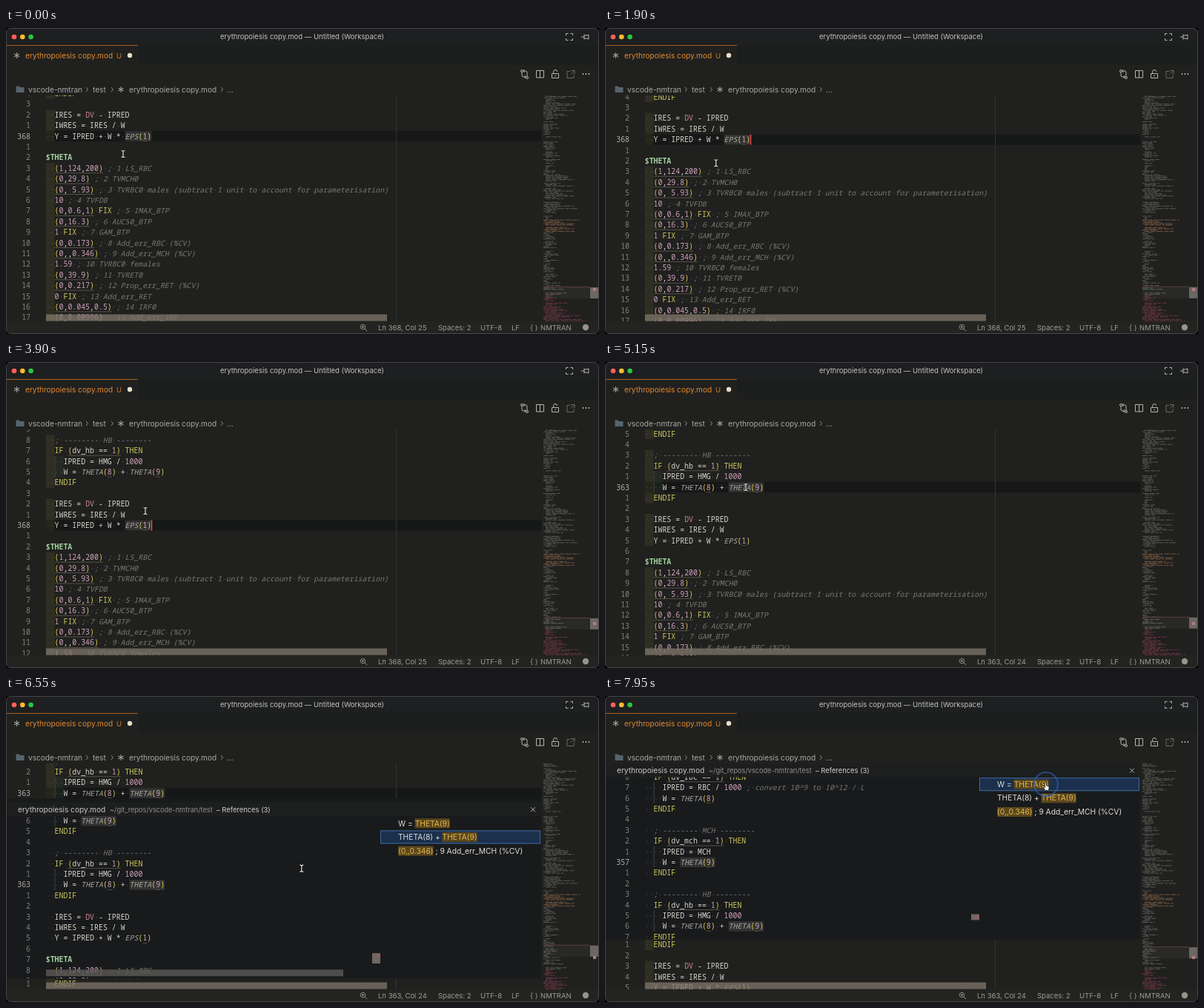
Recreate the animation shown at these times as an HTML page with a canvas. Size 800 px wide and 413 px high, loop 8000 ms.

```html
<!DOCTYPE html>
<html lang="en">
<head>
<meta charset="utf-8">
<title>Editor</title>
<style>
html, body { margin: 0; width: 100%; height: 100%; overflow: hidden; background: #000; }
canvas { display: block; width: 800px; height: 413px; }
</style>
</head>
<body>
<canvas id="stage"></canvas>
<script>
const canvas = document.getElementById('stage');
const g = canvas.getContext('2d');
const ratio = window.devicePixelRatio || 1;
canvas.width = 800 * ratio;
canvas.height = 413 * ratio;

const LOOP = 8000, LINE = 14.4, CHAR = 5.94, CODE_X = 53.7;
const TOP = 91, BOTTOM = 396, PEEK_HEIGHT = 243, PEEK_AFTER = 363;
const MONO = '9.9px "Noto Sans Mono", monospace';
const BG = '#20201f', PEEK_BG = '#191a1c', GREY = '#a9a9a4';
const FIRST_LINE = 348;
const source = `  ; -------- RBC --------
  IF (dv_rbc == 1) THEN
    IPRED = RBC / 1000 ; convert 10^9 to 10^12 / L
    W = THETA(8)
  ENDIF

  ; -------- MCH --------
  IF (dv_mch == 1) THEN
    IPRED = MCH
    W = THETA(9)
  ENDIF

  ; -------- HB --------
  IF (dv_hb == 1) THEN
    IPRED = HMG / 1000
    W = THETA(8) + THETA(9)
  ENDIF

  IRES = DV - IPRED
  IWRES = IRES / W
  Y = IPRED + W * EPS(1)

$THETA
  (1,124,200) ; 1 LS_RBC
  (0,29.8) ; 2 TVMCH0
  (0, 5.93) ; 3 TVRBC0 males (subtract 1 unit to account for parameterisation)
  10 ; 4 TVFDB
  (0,0.6,1) FIX ; 5 IMAX_BTP
  (0,16.3) ; 6 AUC50_BTP
  1 FIX ; 7 GAM_BTP
  (0,0.173) ; 8 Add_err_RBC (%CV)
  (0,,0.346) ; 9 Add_err_MCH (%CV)
  1.59 ; 10 TVRBC0 females
  (0,39.9) ; 11 TVRET0
  (0,0.217) ; 12 Prop_err_RET (%CV)
  0 FIX ; 13 Add_err_RET
  (0,0.045,0.5) ; 14 IRF0
  (0,0.00996) ; 15 Add_err_IRF
  (0,0.37) ; 16 Prop_err_IRF`.split('\n');

// Tables of [time, value...]; values ease between neighbouring rows.
const scrollKeys = [[0, 146], [300, 146], [650, 136], [1600, 136], [2300, 173], [2750, 173],
  [3700, 220.5], [4000, 220.5], [4500, 241], [6300, 241], [7000, 111.6], [7150, 111.6], [7700, 150.4]];
const peekKeys = [[0, 146], [6400, 146], [6800, 77]];
const mouseKeys = [[0, 158, 170], [400, 158, 170], [800, 77, 167], [1500, 77, 167], [2000, 158, 184],
  [2750, 158, 184], [3500, 188, 201], [4100, 188, 201], [4600, 190, 169], [5500, 190, 169],
  [6150, 383, 137], [6300, 383, 137], [6600, 400, 240], [6800, 420, 250], [7050, 509, 331],
  [7150, 509, 331], [7700, 595, 121]];
const CLICK = 4700, PEEK_OPEN = 5300, PICK = 7750;

function sample(keys, t) {
  let i = 0;
  while (i < keys.length - 1 && keys[i + 1][0] <= t) i++;
  const a = keys[i], b = keys[i + 1];
  if (!b) return a.slice(1);
  const p = (t - a[0]) / (b[0] - a[0]), e = p * p * (3 - 2 * p);
  return a.slice(1).map((v, k) => v + (b[k + 1] - v) * e);
}

function rect(x, y, w, h, fill) { g.fillStyle = fill; g.fillRect(x, y, w, h); }
function disc(x, y, r, fill) { g.fillStyle = fill; g.beginPath(); g.arc(x, y, r, 0, 7); g.fill(); }
function icon(d, color = '#b4b4ae', width = 1) {
  g.strokeStyle = color;
  g.lineWidth = width;
  g.stroke(new Path2D(d));
}
function label(text, x, y, size = 10.1, color = GREY, align = 'left') {
  g.font = size + 'px Inter, sans-serif';
  g.textAlign = align;
  g.fillStyle = color;
  g.fillText(text, x, y + size * 0.36);
}
function clipped(x, y, w, h, draw) {
  g.save();
  g.beginPath();
  g.rect(x, y, w, h);
  g.clip();
  draw();
  g.restore();
}
function asterisk(x, y) {
  icon(`M${x} ${y - 4}v8M${x - 3.5} ${y - 2}l7 4M${x - 3.5} ${y + 2}l7 -4`, '#a0a09b', 1.1);
}

function style(token) {
  if (token[0] === ';') return ['#777772', 'italic '];
  if (token[0] === '$') return ['#a3d3a0', 'bold '];
  if (/^(IF|THEN|ENDIF|FIX)$/.test(token)) return ['#cbc85c', ''];
  if (/^(THETA|EPS)$/.test(token)) return ['#a9a89e', 'italic '];
  if (/^[()]$/.test(token)) return ['#ddcf4c', ''];
  if (/^\d/.test(token)) return ['#d0a3bc', ''];
  if (token === 'DV') return ['#c98594', ''];
  return ['#d6d5ca', ''];
}

function codeLine(n, y, current, marked, main) {
  const text = source[n - FIRST_LINE];
  const top = y - LINE / 2, indent = text.search(/\S/);
  if (n === current && main) rect(CODE_X, top, 669, LINE, '#161717');
  if (indent > 0 && main) rect(CODE_X, top, 2 * CHAR, LINE, 'rgba(230,220,90,.07)');
  if (indent > 2) {
    if (main) rect(CODE_X + 2 * CHAR, top, 2 * CHAR, LINE, 'rgba(120,220,120,.05)');
    rect(CODE_X + 2 * CHAR, top, 1, LINE, '#444440');
  }
  const column = i => CODE_X + i * CHAR;
  for (const m of text.matchAll(marked))
    rect(column(m.index), top + 0.5, m[0].length * CHAR, LINE - 1, '#333333');

  g.textAlign = 'right';
  g.font = MONO;
  g.fillStyle = n === current ? '#b0b0aa' : '#82827c';
  g.fillText(n === current ? n : Math.abs(n - current), 33, y + 3.5);

  g.textAlign = 'left';
  for (const m of text.matchAll(/;.*|\$\w+|\d[\d.]*|[A-Za-z_]\w*|\S/g)) {
    const [color, weight] = style(m[0]);
    g.font = weight + MONO;
    g.fillStyle = color;
    g.fillText(m[0], column(m.index), y + 3.5);
  }
  for (const m of text.matchAll(/ /g)) rect(column(m.index + 0.42), y, 1, 1, '#575752');
  for (const m of text.split(';')[0].matchAll(/\([^()]+\)/g)) {
    const inset = /[A-Z]/.test(text[m.index - 1]) ? 1 : 0;
    rect(column(m.index + inset), y + 6, (m[0].length - 2 * inset) * CHAR, 1, '#535044');
  }
}

function codeLines(position, top, bottom, current, marked, main) {
  source.forEach((_, i) => {
    const y = position(FIRST_LINE + i);
    if (y > top - LINE && y < bottom + LINE) codeLine(FIRST_LINE + i, y, current, marked, main);
  });
}

function listRow(y, parts, selected) {
  if (selected) {
    rect(505, y - 9, 216, 18, '#1b304d');
    g.strokeStyle = '#41699b';
    g.lineWidth = 1;
    g.strokeRect(505.5, y - 8.5, 215, 17);
  }
  let x = 529;
  for (const [text, hit] of parts) {
    g.font = '10.25px Inter, sans-serif';
    const width = g.measureText(text).width;
    if (hit) rect(x, y - 6.5, width, 13, '#5b471d');
    label(text, x, y, 10.25, hit ? '#e3b750' : '#dededa');
    x += width;
  }
}

function peek(anchor, t) {
  const top = anchor + LINE / 2, end = top + PEEK_HEIGHT, body = anchor + 31;
  const picked = t >= PICK, current = picked ? 357 : 363;
  const offset = picked ? 146 : sample(peekKeys, t)[0];
  rect(0, top, 722, PEEK_HEIGHT, PEEK_BG);
  rect(0, top + 5, 722, body - top - 5, '#1d1e1e');
  const y = anchor + 22.2;
  label('erythropoiesis copy.mod', 16, y, 10.1, '#c9c9c4');
  label('~/git_repos/vscode-nmtran/test', 140, y, 9.2, '#8f8f8a');
  label('– References (3)', 284, y, 9.4, '#d0d0cb');
  icon(`M708 ${y - 3}l6 6m0 -6l-6 6`);
  clipped(0, body, 505, end - body, () => {
    codeLines(n => anchor + offset + (n - current) * LINE, body, end, current, /THETA\(9\)/g, false);
    if (t > 6400 && t < 7300) rect(54, end - 12, 401, 9, 'rgba(90,89,86,.8)');
    const marker = anchor + 220;
    rect(494, marker - 4, 11, picked ? 8 : 14, '#6d6863');
    rect(498, marker - 1, 7, 2, '#a85561');
  });
  listRow(anchor + 40.8, [['W = '], ['THETA(9)', 1]], picked);
  listRow(anchor + 59.4, [['THETA(8) + '], ['THETA(9)', 1]], !picked);
  listRow(anchor + 78, [['(0,,0.346)', 1], [' ; 9 Add_err_MCH (%CV)']], false);
}

const noise = i => { const v = Math.sin(i * 12.9898) * 43758.5453; return v - Math.floor(v); };

// Minimap sections: [bottom, narrowest, widest, colour]
const DIM = 'rgba(180,180,170,.36)', PINK = 'rgba(175,75,105,.5)';
const sections = [[128, 10, 46, DIM], [145, 8, 25, DIM], [186, 12, 32, DIM], [196, 4, 20, DIM],
  [246, 16, 46, DIM], [258, 6, 18, DIM], [275, 20, 54, 'rgba(195,140,95,.5)'], [300, 6, 20, DIM],
  [352, 4, 24, DIM], [360, 10, 36, DIM], [376, 8, 34, PINK], [396, 18, 60, PINK]];

function minimap(scroll, open) {
  rect(722, TOP, 77, BOTTOM - TOP, BG);
  const shift = open ? 9 : 0;
  for (let i = -6; i < 180; i++) {
    const y = 92 + i * 1.7, r = noise(i + 30);
    if (r < 0.12) continue;
    const [, min, max, color] = sections.find(s => y < s[0]) || sections.at(-1);
    const end = 725 + min + (max - min) * r * r;
    let x = 725 + (noise(i + 90) > 0.5 ? 3 : 0);
    for (let k = 0; x < end; k++) {
      const word = Math.min(end - x, 3 + noise(i * 7 + k) * 8);
      rect(x, y + shift, word, 1, color);
      x += word + 1.5;
    }
  }
  const slider = open ? 335 + (241 - scroll) * 0.046 : 350 - (scroll - 146) * 0.055;
  rect(725, slider, 63, 15, 'rgba(255,255,255,.04)');
  rect(725, slider - 1, 63, 1, '#5c4042');
  rect(788, slider, 11, 15, '#6c6762');
  rect(792, 351, 4, 4, '#b7797f');
}

function editor(t) {
  const scroll = sample(scrollKeys, t)[0], open = t >= PEEK_OPEN;
  const current = t < CLICK ? 368 : 363;
  const position = n => scroll + (n - 368) * LINE + (open && n > PEEK_AFTER ? PEEK_HEIGHT : 0);
  clipped(0, TOP, 800, BOTTOM - TOP, () => {
    codeLines(position, TOP, BOTTOM, current, current === 368 ? /EPS\(1\)/g : /THETA\(9\)/g, true);
    rect(526, TOP, 1, BOTTOM - TOP, '#333331');
    if (t % 1000 >= 600 && !open) {
      const column = current === 368 ? 24 : 23;
      rect(CODE_X + column * CHAR - 0.5, position(current) - 7, 1.5, 14, '#e2485c');
    }
    if (open) peek(position(PEEK_AFTER), t);
    minimap(scroll, open);
    rect(54, 386.5, 460, 9, 'rgba(125,116,104,.78)');
    if (open && position(PEEK_AFTER) + 220 > 380) rect(494, 382, 11, 13, '#918b83');
  });
  if (t >= 750 && t < 1550) {
    rect(54, 137.5, 595, 20, '#2a2a29');
    rect(54.5, 138, 594, 19, '#1c1d1d');
    label('Gives initial estimates and bounds for elements of the THETA matrix. Thetas are numbered in the order in which they are defined.',
      61, 148, 9.55, '#d2d2cd');
  }
}

function chrome(t) {
  rect(0, 0, 800, 23, '#1e1f20');
  rect(0, 23, 800, 27, '#1c1d1d');
  rect(0, 23, 178, 27, BG);
  rect(0, 23, 178, 1, '#a85f1c');
  ['#ff5f57', '#febc2e', '#28c840'].forEach((c, i) => disc(11 + i * 11.3, 12, 3.3, c));
  label('erythropoiesis copy.mod — Untitled (Workspace)', 399.5, 12, 9.5, '#c2c2bd', 'center');
  icon('M755.5 10v-2.5h3M761.5 7.5h3v2.5M764.5 14v2.5h-3M758.5 16.5h-3v-2.5');
  icon('M776 12h4M780 8.5v7M780 10h3l3 -1v6l-3 -1h-3');

  asterisk(14.5, 37);
  label('erythropoiesis copy.mod', 26, 37.5, 10.1, '#e28a2d');
  label('U', 149, 37.5, 9.5, '#d07c27');
  disc(167, 37, 3.2, '#e8dfc9');

  icon('M696 59v5q0 2 2 2h3M699.5 64l2 2l-2 2M703 65v-5q0 -2 -2 -2h-3M699.5 56l-2 2l2 2');
  for (const [x, y] of [[696, 58], [703, 67]]) { g.beginPath(); g.arc(x, y, 1.5, 0, 7); g.stroke(); }
  icon('M715.5 57.5h10v9.5h-10zM720.5 57.5v9.5');
  icon('M736.5 61.5h9v6h-9zM738.5 61.5v-2q0 -3 2.5 -3t2.5 2.5M741 63.5v2');
  icon('M761 58.5h-4v9h9v-4M762 57.5h5v5M767 57.5l-5 5', '#686864');
  for (const x of [778.5, 782.5, 786.5]) disc(x, 62, 0.9, '#c4c4be');

  g.fillStyle = '#56646b';
  g.fill(new Path2D('M13.5 78.5h4l1.5 1.5h5.5v7h-11z'));
  label('vscode-nmtran', 30, 83);
  label('test', 117, 83);
  asterisk(155, 83);
  label('erythropoiesis copy.mod', 166, 83);
  for (const x of [108, 142, 290]) icon(`M${x} 80l2.5 3l-2.5 3`, '#898984');
  label('...', 298, 83);

  rect(0, BOTTOM, 800, 17, '#232322');
  g.beginPath();
  g.arc(481.5, 403.5, 3.2, 0, 7);
  g.strokeStyle = '#94948f';
  g.stroke();
  icon('M484 406l3 3M480 403.5h3M481.5 402v3', '#94948f');
  label(t < CLICK ? 'Ln 368, Col 25' : 'Ln 363, Col 24', 502, 404.5, 9.5, '#9c9c97');
  [['Spaces: 2', 583], ['UTF-8', 640], ['LF', 682], ['{ }', 707], ['NMTRAN', 721]]
    .forEach(([text, x]) => label(text, x, 404.5, 9.5, '#9c9c97'));
  disc(782, 404, 4.2, '#94948f');
}

function pointer(t) {
  const [x, y] = sample(mouseKeys, t);
  if (t < 7600) {
    const beam = `M${x - 2.5} ${y - 4.5}q2.5 0 2.5 1.5v6q0 1.5 -2.5 1.5M${x + 2.5} ${y - 4.5}q-2.5 0 -2.5 1.5v6q0 1.5 2.5 1.5`;
    icon(beam, '#111', 2.6);
    icon(beam, '#e6e6e2', 1.2);
    return;
  }
  if (t >= PICK) {
    g.beginPath();
    g.arc(595, 119, 16, 0, 7);
    g.strokeStyle = 'rgba(48,92,165,.7)';
    g.lineWidth = 2;
    g.stroke();
  }
  const hand = new Path2D(`M${x - 1.5} ${y - 3}q1 -1 2 0v3l3.5 1v3l-1 2.5h-4l-2.5 -4q.5 -1.5 2 0z`);
  g.fillStyle = '#f2f2ef';
  g.fill(hand);
  g.strokeStyle = '#111';
  g.lineWidth = 0.7;
  g.stroke(hand);
}

function draw(t) {
  g.setTransform(ratio, 0, 0, ratio, 0, 0);
  rect(0, 0, 800, 413, '#000');
  g.save();
  g.beginPath();
  g.roundRect(0.5, 0.5, 799, 412, 6);
  g.clip();
  rect(0, 0, 800, 413, BG);
  editor(t);
  chrome(t);
  pointer(t);
  g.restore();
  g.beginPath();
  g.roundRect(0.5, 0.5, 799, 412, 6);
  g.strokeStyle = '#464645';
  g.lineWidth = 1;
  g.stroke();
}

const start = performance.now();
function frame() {
  draw((performance.now() - start) % LOOP);
  requestAnimationFrame(frame);
}
frame();
</script>
</body>
</html>
```
